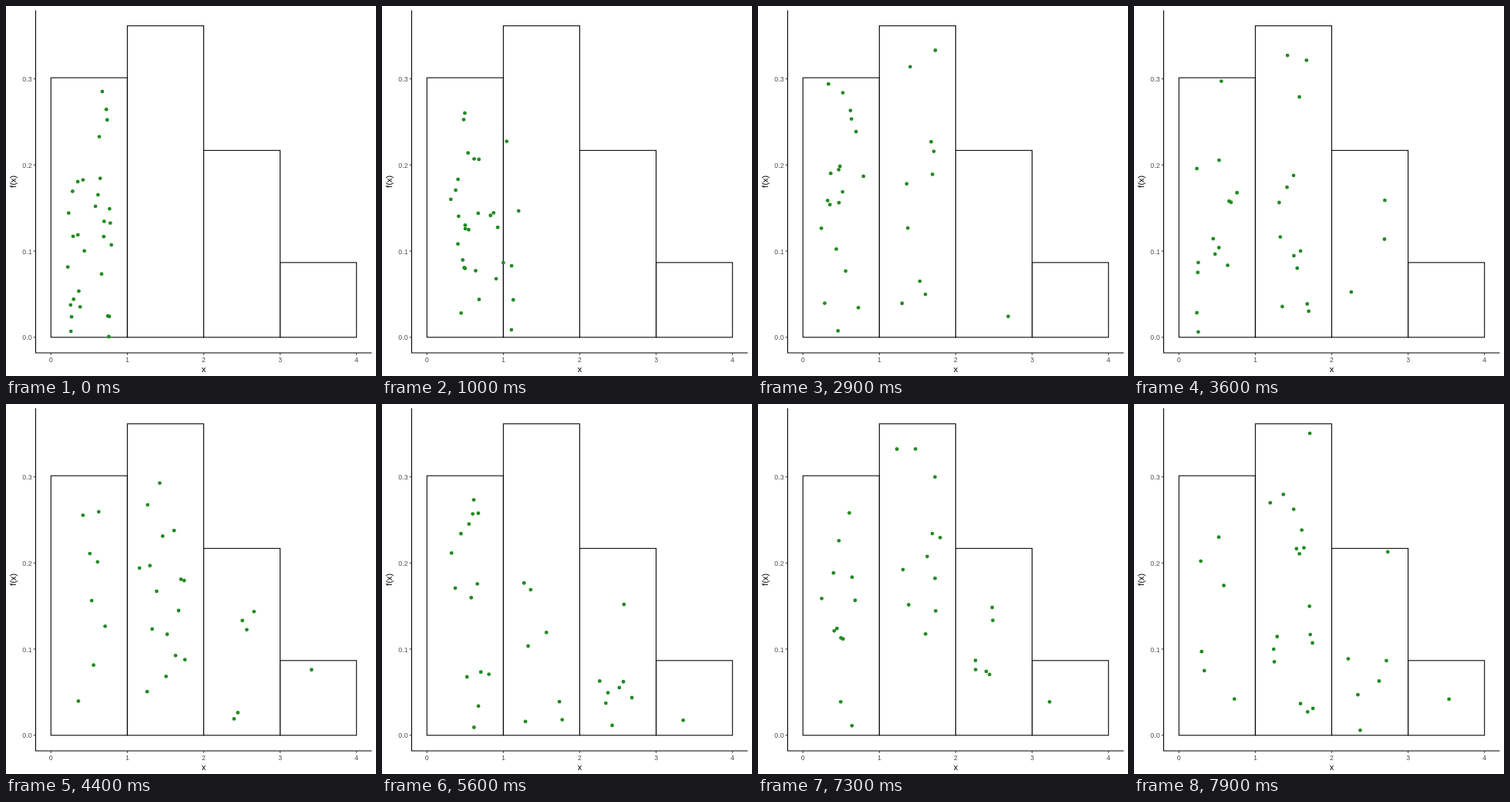
An HTML page that plays this animation: 480 by 480 pixels, repeating every 8000 ms.

```html
<!DOCTYPE html>
<html lang="en">
<head>
<meta charset="utf-8">
<title>Random walkers on a histogram</title>
<style>
  html, body { margin: 0; width: 100%; height: 100%; overflow: hidden; background: #fff; }
  svg { display: block; width: 100vw; height: 100vh; font-family: "Liberation Sans", Arial, sans-serif; }
  .line { fill: none; stroke: #000; stroke-width: 1.07; }
  .tick { stroke: #333; stroke-width: 1.07; }
  .label { font-size: 8.8px; fill: #4d4d4d; }
  .title { font-size: 11px; text-anchor: middle; }
  .dot { fill: #228b22; }
</style>
</head>
<body>
<svg id="plot" viewBox="0 0 480 480"></svg>
<script>
const LOOP = 8000, FRAME = 100, FIRST_HOLD = 7, CYCLE = 11, MOVE = 8;
const RATE = 1.2, COUNT = 30, BAR_WIDTH = 99.1, UNIT_HEIGHT = 1118;
const plot = document.getElementById("plot");
const px = x => 58.3 + BAR_WIDTH * x;
const py = y => 429.8 - UNIT_HEIGHT * y;

function add(tag, attributes, text = "") {
  const node = document.createElementNS(plot.namespaceURI, tag);
  for (const name in attributes) node.setAttribute(name, attributes[name]);
  node.textContent = text;
  return plot.appendChild(node);
}

// Poisson probabilities for 0 to 3
const heights = [Math.exp(-RATE)];
for (let k = 1; k < 4; k++) heights.push(heights[k - 1] * RATE / k);

function drawChart() {
  heights.forEach((h, k) => add("rect", {
    class: "line", x: px(k), y: py(h), width: BAR_WIDTH, height: UNIT_HEIGHT * h
  }));
  add("path", { class: "line", d: "M38.5 5.5V450H474.5" });
  for (let k = 0; k <= 4; k++) {
    add("path", { class: "tick", d: `M${px(k)} 450v2.7` });
    add("text", { class: "label", x: px(k), y: 462, "text-anchor": "middle" }, k);
  }
  for (let k = 0; k <= 3; k++) {
    const y = py(k / 10);
    add("path", { class: "tick", d: `M38.5 ${y}h-2.7` });
    add("text", { class: "label", x: 33.6, y: y + 3.6, "text-anchor": "end" }, (k / 10).toFixed(1));
  }
  add("text", { class: "title", x: 256.5, y: 475 }, "x");
  add("text", { class: "title", transform: "translate(13.4 227.7) rotate(-90)" }, "f(x)");
}

let seed = 20;
function random() {
  seed = (seed * 1664525 + 1013904223) % 4294967296;
  return seed / 4294967296;
}

// Number of walkers in each bar at every stop
const crowds = [
  [30], [20, 10], [19, 10, 1], [14, 13, 3],
  [8, 16, 5, 1], [14, 7, 8, 1], [12, 11, 6, 1], [6, 17, 6, 1]
];

// Walkers mostly stay or step to a neighbouring bar, then land at random inside it.
function buildStops() {
  const walkers = Array.from({ length: COUNT }, (_, i) => i);
  const bars = walkers.map(() => 0);
  return crowds.map(crowd => {
    const rank = bars.map(bar => bar + 1.2 * random());
    const order = [...walkers].sort((a, b) => rank[a] - rank[b]);
    crowd.forEach((size, bar) => {
      for (const walker of order.splice(0, size)) bars[walker] = bar;
    });
    return bars.map(bar => [px(bar + 0.2 + 0.6 * random()), py(heights[bar] * random())]);
  });
}

const ease = p => p < 0.5 ? 4 * p ** 3 : 1 - 4 * (1 - p) ** 3;

drawChart();
const stops = buildStops();
const dots = stops[0].map(() => add("circle", { class: "dot", r: 2.4 }));

function render(time) {
  const step = Math.floor(time % LOOP / FRAME) - FIRST_HOLD;
  const leg = Math.max(0, Math.floor(step / CYCLE));
  const progress = step < 0 ? 0 : ease(Math.min(1, (step % CYCLE + 1) / MOVE));
  dots.forEach((dot, i) => {
    const [x0, y0] = stops[leg][i], [x1, y1] = stops[leg + 1][i];
    dot.setAttribute("cx", x0 + (x1 - x0) * progress);
    dot.setAttribute("cy", y0 + (y1 - y0) * progress);
  });
}

const began = performance.now();
function tick() {
  render(performance.now() - began);
  requestAnimationFrame(tick);
}
tick();
</script>
</body>
</html>
```
